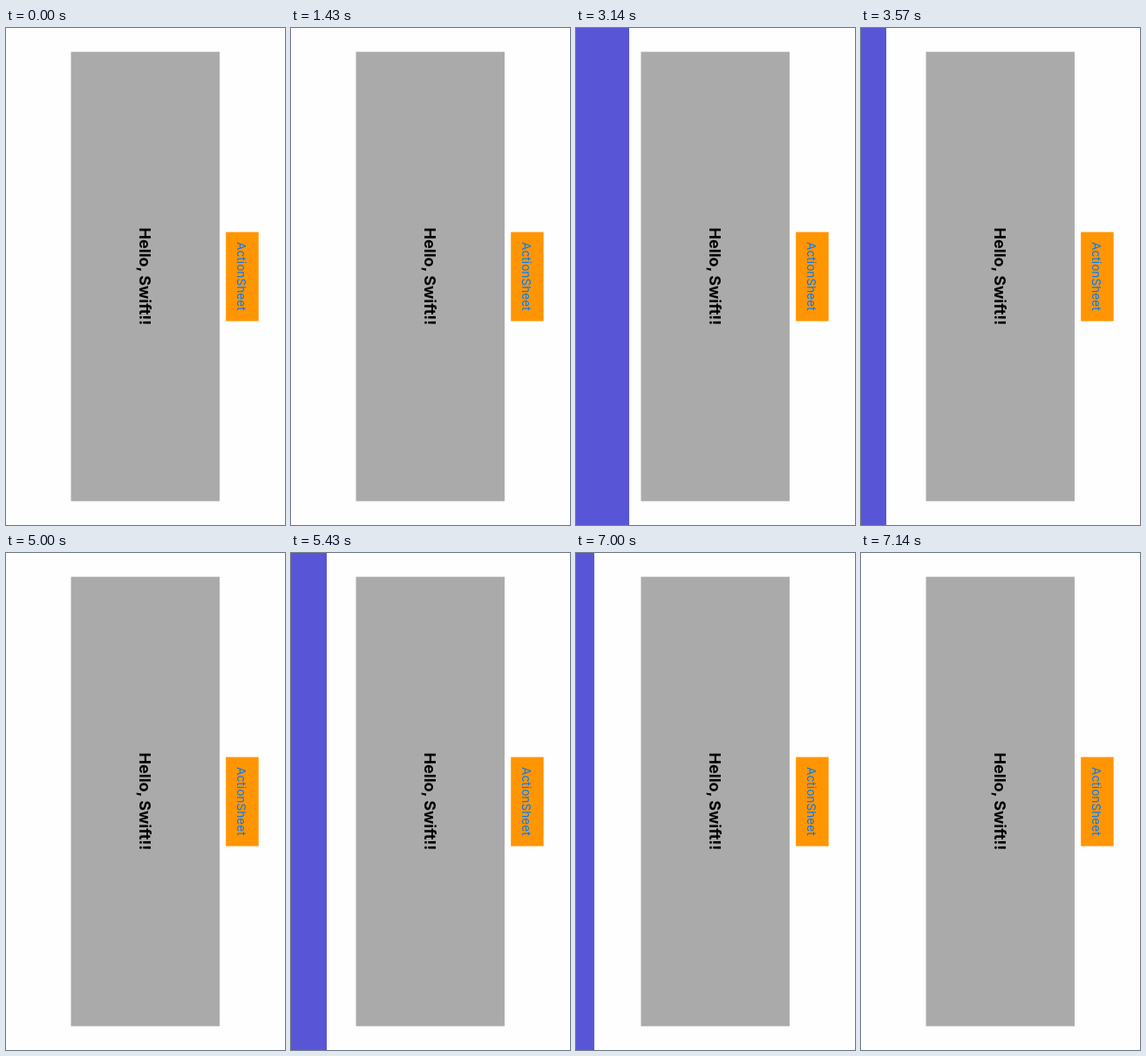
An HTML page for the animation above (7.28 s loop, 320 by 569 pixels).

```html
<!DOCTYPE html>
<html lang="en">
<head>
<meta charset="utf-8">
<title>Slide-in panel</title>
<style>
  html, body {
    margin: 0;
    width: 100%;
    height: 100%;
    overflow: hidden;
    background: #fefefe;
  }
  svg {
    display: block;
    width: 320px;
    height: 569px;
  }
  text {
    font-family: Inter, "Liberation Sans", sans-serif;
    text-anchor: middle;
  }
  .card { fill: #aaa; }
  .title { font-size: 18px; font-weight: 700; fill: #000; }
  .button { fill: #ff9500; }
  .caption { font-size: 13.7px; fill: #007aff; }
  .panel {
    fill: #5856d6;
    animation: slide 7280ms step-end infinite;
  }

  /* The panel moves at about seven steps per second: two openings, two closings. */
  @keyframes slide {
    0%      { transform: translateX(0); }
    23.488% { transform: translateX(6px); }
    25.549% { transform: translateX(56px); }
    27.472% { transform: translateX(61px); }
    45.192% { transform: translateX(60px); }
    47.115% { transform: translateX(57px); }
    49.038% { transform: translateX(29px); }
    50.961% { transform: translateX(0); }
    72.664% { transform: translateX(1px); }
    74.587% { transform: translateX(41px); }
    76.510% { transform: translateX(61px); }
    92.170% { transform: translateX(60px); }
    94.230% { transform: translateX(57px); }
    96.153% { transform: translateX(21px); }
    98.076%, 100% { transform: translateX(0); }
  }
</style>
</head>
<body>
<svg viewBox="0 0 320 569">
  <rect class="card" x="74.5" y="27.3" width="170.5" height="514.4"/>
  <text class="title" transform="translate(152.8 284.5) rotate(90)">Hello, Swift!!</text>
  <rect class="button" x="252.2" y="233.6" width="37.5" height="102"/>
  <text class="caption" transform="translate(265.4 284.4) rotate(90)">ActionSheet</text>
  <rect class="panel" x="-61" y="0" width="61" height="569"/>
</svg>
</body>
</html>
```
